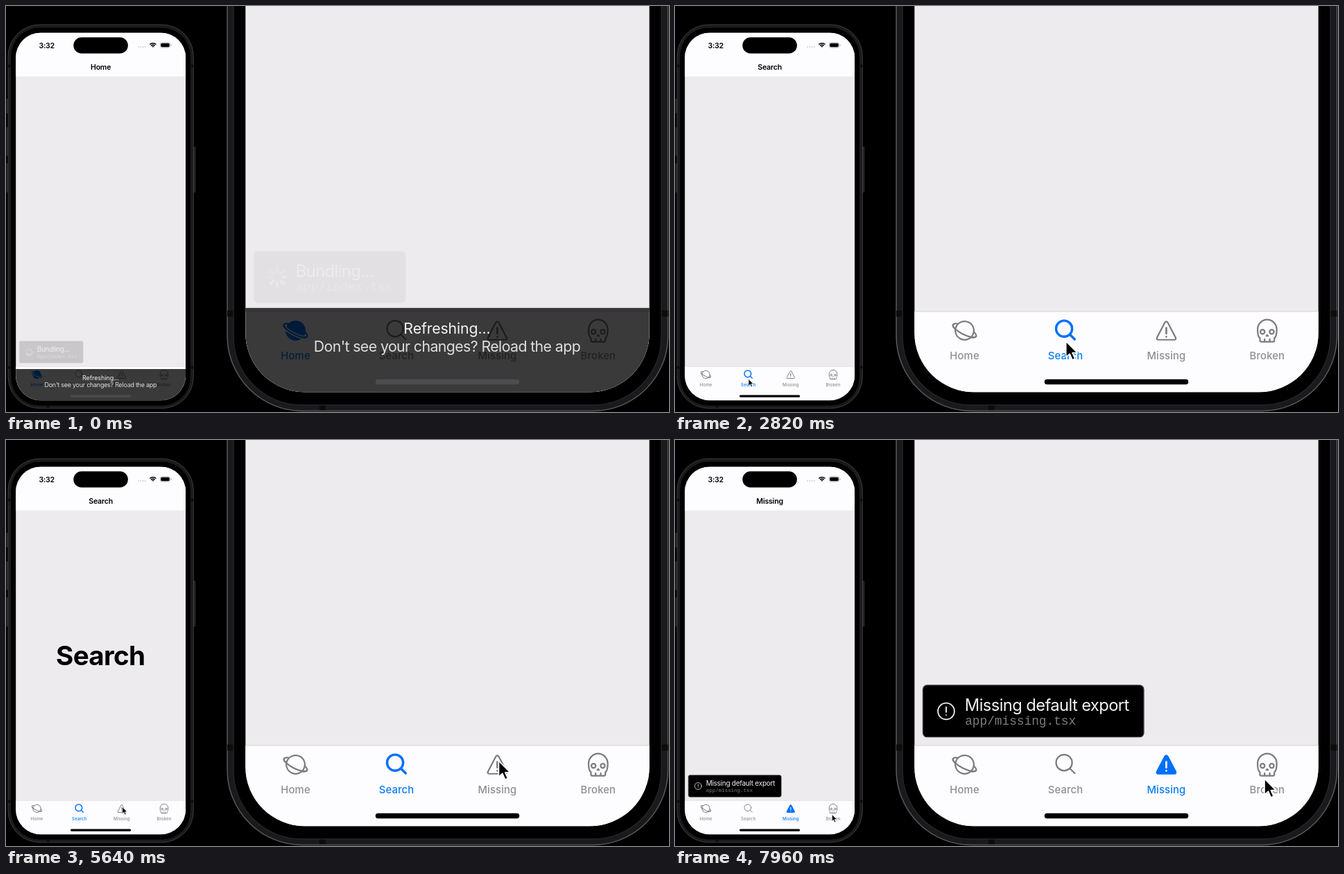
An HTML page that plays this animation: 956 px wide and 586 px high, repeating every 8 s.

```html
<!DOCTYPE html>
<html lang="en">
<head>
<meta charset="utf-8">
<title>Tab bundling</title>
<style>
  html, body { margin: 0; width: 100%; height: 100%; overflow: hidden; background: #000; }
  svg { display: block; width: 100%; height: 100%; font-family: Inter, "Liberation Sans", sans-serif; font-optical-sizing: none; }
  .mid { text-anchor: middle; }
  .line { fill: none; stroke: currentColor; stroke-linecap: round; stroke-linejoin: round; }
  .h1 { font-size: 62px; font-weight: 700; letter-spacing: -1.2px; }
  .h2 { font-size: 35px; letter-spacing: -1.5px; fill: #363a3f; }
  .bar { font-size: 17px; font-weight: 600; letter-spacing: -.35px; }
  .tab { color: #7b7b7e; stroke-width: 1.5; }
  .tab text { font-size: 10px; font-weight: 500; letter-spacing: .1px; fill: #8e8e92; stroke: none; }
  .tab .body { fill: #fdfcff; }
  .tab .halo { fill: none; stroke: none; }
  .tab .mark { stroke: currentColor; }
  .tab.on { color: #0070fa; }
  .tab.on text { fill: #0a7cf5; }
  .tab.on .body { fill: currentColor; }
  .tab.on .halo { stroke: #fdfcff; stroke-width: 3.4; }
  .tab.on .mark { stroke: #fdfcff; }
  .tab.on .lens { stroke-width: 2.3; }
  .note { font-size: 16px; letter-spacing: -.4px; fill: #f2f2f2; }
  .file { font: 12px "Liberation Mono", "Courier New", monospace; fill: #7c7c7c; }
  .banner text { font-size: 14.4px; letter-spacing: -.41px; fill: #dededf; }
  .banner .lead { letter-spacing: -.1px; fill: #f4f4f5; }
</style>
</head>
<body>
<svg id="stage" viewBox="0 0 956 586" preserveAspectRatio="none">
  <defs>
    <clipPath id="screen"><rect width="393" height="851.5" rx="58"/></clipPath>
  </defs>
</svg>
<script>
const LOOP = 8000;
const stage = document.getElementById('stage');

const icons = {
  Home: `<g transform="rotate(27)">
      <ellipse class="line" rx="12.6" ry="3.9"/>
      <circle class="body" r="9" stroke="currentColor"/>
      <path class="halo" d="M-10 2.4A12.6 3.9 0 0 0 10 2.4"/>
      <path class="line" d="M-12.6 0A12.6 3.9 0 0 0 12.6 0"/></g>`,
  Search: `<g class="line lens"><circle cx="-1.3" cy="-1.8" r="7.8"/><path d="M4.4 3.9L9 8.5"/></g>`,
  Missing: `<path class="body" d="M-1.4 -7.8Q0 -9.8 1.4 -7.8L9.1 7Q9.8 9 7.8 9H-7.8Q-9.8 9 -9.1 7Z" stroke="currentColor"/>
      <path class="line mark" d="M0 -2.6V3M0 6V6.1" style="stroke-width:1.8"/>`,
  Broken: `<g class="line"><path d="M-7 9.6V7.4C-9 6 -9.3 3 -9.3 -1A9.3 9.6 0 0 1 9.3 -1C9.3 3 9 6 7 7.4V9.6Q7 10.9 5.7 10.9H-5.7Q-7 10.9 -7 9.6Z"/>
      <circle cx="-4.5" cy="1.2" r="2.1"/><circle cx="4.5" cy="1.2" r="2.1"/>
      <path d="M-.8 5.4L0 4.4L.8 5.4M-2.5 8.4V10.6M2.5 8.4V10.6"/></g>`
};
const names = Object.keys(icons);

const tabs = names.map((name, i) => `
  <g class="tab" transform="translate(${48.8 + i * 98.1} 791.5)">${icons[name]}
    <text class="mid" y="28.2">${name}</text></g>`).join('');

const spokes = [...Array(8)].map((_, k) =>
  `<path d="M0 -5V-9.2" transform="rotate(${k * 45})" opacity="${.2 + k * .085}"/>`).join('');

const box = (x, y, w, h, fill, rx = 0, more = '') =>
  `<rect x="${x}" y="${y}" width="${w}" height="${h}" rx="${rx}" fill="${fill}" ${more}/>`;

// One phone, drawn in screen points (393 x 852).
const markup = `
  ${[[-22, 153, 34], [-22, 219, 66], [-22, 302, 68], [410, 264, 106]]
    .map(([x, y, h]) => box(x, y, 6, h, '#252527', 1.5)).join('')}
  ${box(-17.6, -18.6, 428.6, 888.4, '#1a1a1c', 73, 'stroke="#58595c" stroke-width="1"')}
  ${box(-17.6, 772, 6, 6, '#0c0c0d')}${box(405, 772, 6, 6, '#0c0c0d')}
  ${box(-17.6, 74, 6, 6, '#0c0c0d')}${box(405, 74, 6, 6, '#0c0c0d')}${box(72, 864, 6, 5, '#0c0c0d')}
  ${box(-11.5, -12, 416, 876, '#000', 66, 'stroke="#29292b" stroke-width=".8"')}
  <g clip-path="url(#screen)">
    ${box(0, 0, 393, 852, '#edebee')}
    ${box(0, 0, 393, 102, '#fdfcff')}${box(0, 101.6, 393, .5, '#d9d8db')}
    <text class="bar mid" x="71.5" y="35.3">3:32</text>
    ${box(133.5, 11, 126, 37, '#000', 18.5)}
    ${[0, 1, 2, 3].map(i => `<circle cx="${284 + i * 5.2}" cy="33" r="1.3" fill="#b9b9bc"/>`).join('')}
    <g transform="translate(317.3 34)" fill="none" stroke="#000" stroke-width="2.3">
      <path d="M-7.4 -6.6A10.5 10.5 0 0 1 7.4 -6.6M-4.7 -3.7A6.6 6.6 0 0 1 4.7 -3.7"/>
      <path d="M0 0L-2.5 -2.2A3.5 3.5 0 0 1 2.5 -2.2Z" fill="#000" stroke="none"/></g>
    ${box(333.8, 22.8, 23.4, 12, '#fdfcff', 4, 'stroke="#9a9a9d"')}${box(335.5, 24.5, 20, 8.6, '#000', 2.5)}
    ${box(358.6, 27, 1.4, 4, '#9a9a9d', .7)}
    <text class="bar mid title" x="196.5" y="86.6"></text>
    <g class="page">
      <text class="h1" x="26" y="418">Hello World</text>
      <text class="h2" x="27" y="467.2">This is the first page</text>
      <text class="h2" x="27" y="511.2">of your app.</text></g>
    <g class="page"><text class="h1 mid" x="195.9" y="460">Search</text></g>
    ${box(0, 773, 393, 79, '#fdfcff')}${box(0, 772.7, 393, .6, '#cfced1')}
    ${tabs}
    <g class="toast">
      ${box(8.3, 714.3, 147, 50.4, '#000', 4, 'class="card" stroke="#3c3d3c" stroke-width=".9"')}
      <g transform="translate(30.9 739.6)">
        <g class="spin" fill="none" stroke="#fff" stroke-width="2.2" stroke-linecap="round">${spokes}</g>
        <g class="warn" fill="none" stroke="#e6e6e6" stroke-width="1.3" stroke-linecap="round">
          <circle r="8"/><path d="M0 -4V.8M0 3.7V3.8"/></g></g>
      <text class="note" x="49" y="739"></text>
      <text class="file" x="49.2" y="752.8"></text></g>
    <g class="banner">${box(0, 0, 393, 90, '#000', 0, 'opacity=".77"')}
      <text class="mid lead" x="196.1" y="25.1">Refreshing...</text>
      <text class="mid" x="196.1" y="42.4">Don't see your changes? Reload the app</text></g>
    ${box(126.5, 839, 140, 5, '#000', 2.5, 'class="grip"')}
  </g>
  <path class="cursor" d="M0 0V15.6L3.6 12.3 6.2 18.2 8.8 17.1 6.3 11.3H11.2Z"
    fill="#000" stroke="#fff" stroke-width="1.1" stroke-linejoin="round"/>`;

// [start in, fully in, start out, fully out]
const toasts = [
  { at: [-5, 150, 1420, 1640], file: 'index', width: 147.4 },
  { at: [2850, 3010, 3760, 3960], file: 'search', width: 154.8 },
  { at: [5800, 5960, 6470, 6630], file: 'missing', width: 162 },
  { at: [6635, 6805, 9000, 9100], file: 'missing', width: 214.8, warn: true }
];
const pages = [[1400, 2750], [3740, 5690]];

// [time, x, y]
const moves = [
  [1920, 198, 888], [1960, 192.1, 868.8], [2500, 147, 794], [2800, 147, 794], [3300, 152, 890],
  [4600, 231, 888], [5100, 251, 800], [5360, 246.4, 787.9], [5720, 246.4, 787.9], [6200, 252, 890],
  [6930, 326, 888], [7700, 338, 822], [7780, 338, 822], [7960, 340.5, 805.4], [8000, 340.7, 804]
];
// [time, top edge of the banner]
const slide = [[0, 769], [60, 800], [120, 832], [180, 848.5], [215, 853]];

const clamp = v => Math.max(0, Math.min(1, v));
const easeOut = p => 1 - (1 - p) ** 2;

function sample(keys, t, ease = p => p) {
  if (t <= keys[0][0]) return keys[0].slice(1);
  const i = keys.findIndex(k => k[0] > t);
  if (i < 0) return keys[keys.length - 1].slice(1);
  const [t0, ...from] = keys[i - 1], [t1, ...to] = keys[i];
  const p = ease((t - t0) / (t1 - t0));
  return from.map((v, n) => v + (to[n] - v) * p);
}

function addPhone(x, y, scale, lead) {
  const root = document.createElementNS('http://www.w3.org/2000/svg', 'g');
  root.setAttribute('transform', `translate(${x} ${y}) scale(${scale})`);
  root.innerHTML = markup;
  stage.append(root);
  const get = name => root.querySelector('.' + name);
  const all = name => [...root.querySelectorAll('.' + name)];
  const parts = Object.fromEntries(
    ['title', 'toast', 'card', 'spin', 'warn', 'note', 'file', 'banner', 'grip', 'cursor'].map(n => [n, get(n)]));
  return { ...parts, tabs: all('tab'), pages: all('page'), lead };
}

const show = (el, on) => el.setAttribute('visibility', on ? 'visible' : 'hidden');
const say = (el, text) => { if (el.textContent !== text) el.textContent = text; };

function drawToast(p, t) {
  const item = toasts.find(({ at }) => t >= at[0] && t < at[3]);
  p.toast.setAttribute('display', item ? 'inline' : 'none');
  if (!item) return;
  const [a, b, c, d] = item.at;
  p.toast.setAttribute('opacity', Math.min(clamp((t - a) / (b - a)), clamp((d - t) / (d - c))));
  p.card.setAttribute('width', item.width);
  say(p.note, item.warn ? 'Missing default export' : 'Bundling...');
  say(p.file, `app/${item.file}.tsx`);
  show(p.warn, item.warn);
  show(p.spin, !item.warn);
  p.spin.setAttribute('transform', `rotate(${Math.floor((t - b) / 100) * 45})`);
}

function draw(p, t) {
  const early = t < 150 ? t + p.lead : t;
  const tab = t < 2750 ? 0 : t < 5690 ? 1 : 2;
  say(p.title, names[tab]);
  p.tabs.forEach((el, i) => el.classList.toggle('on', i === tab));
  p.pages.forEach((el, i) => show(el, t >= pages[i][0] && t < pages[i][1]));
  drawToast(p, early);
  p.banner.setAttribute('transform', `translate(0 ${sample(slide, early)[0]})`);
  p.grip.setAttribute('fill', early < 110 ? '#4d4c4f' : '#000');
  p.cursor.setAttribute('transform', `translate(${sample(moves, t, easeOut).join(' ')})`);
}

const phones = [addPhone(14.1, 38.5, .6234, 18), addPhone(345.2, -705, 1.4825, 0)];
const start = performance.now();

function frame(now) {
  const t = Math.max(0, now - start) % LOOP;
  phones.forEach(p => draw(p, t));
  requestAnimationFrame(frame);
}
frame(start);
</script>
</body>
</html>
```
